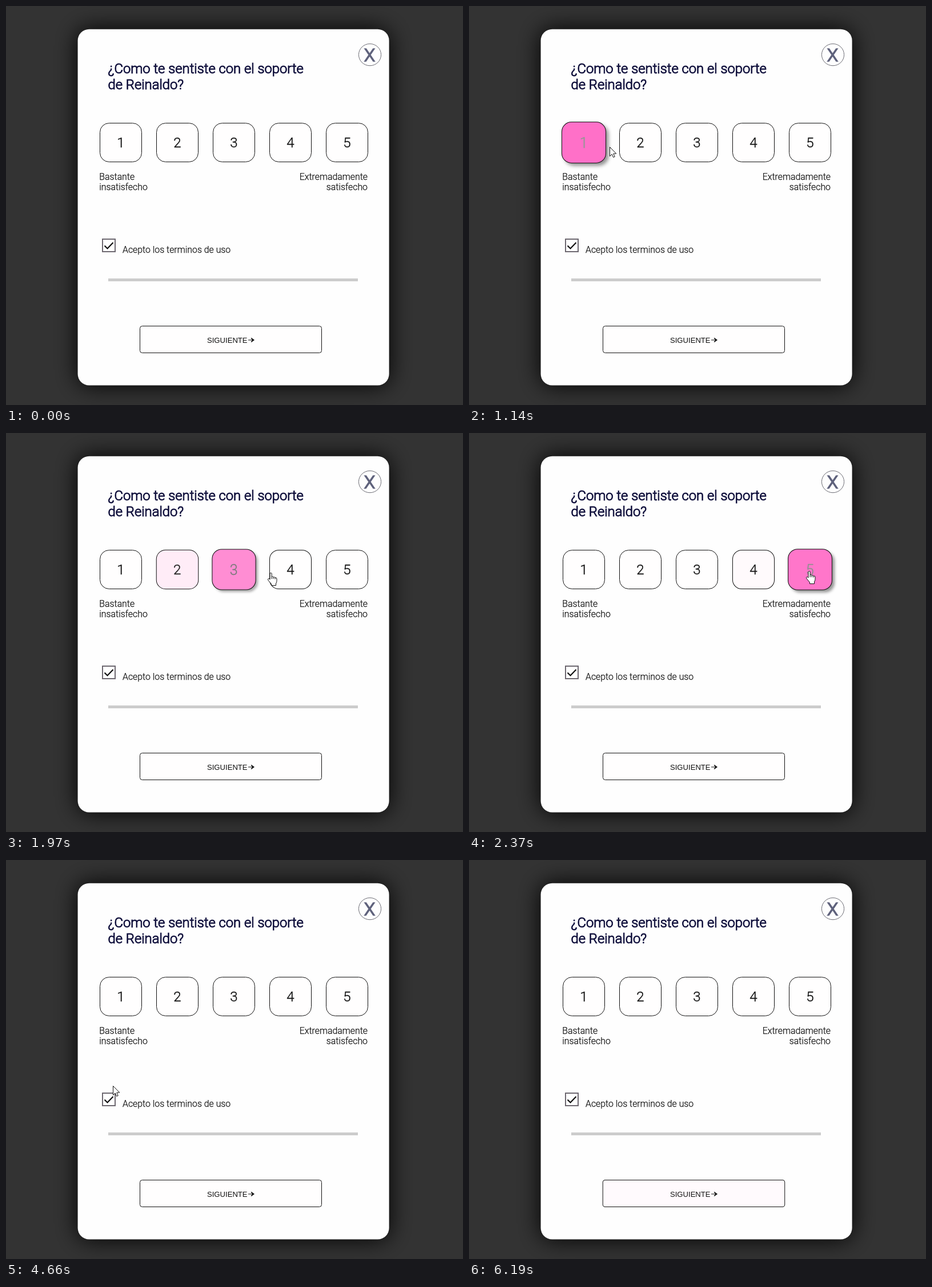
An HTML page that plays this animation: 800 by 700 pixels, repeating every 6590 ms.

```html
<!DOCTYPE html>
<html lang="es">
<head>
<meta charset="utf-8">
<style>
html, body { margin: 0; width: 100%; height: 100%; overflow: hidden; background: #333; }
svg { display: block; width: 800px; height: 700px; }
text { font-family: Roboto, sans-serif; font-weight: 300; }
.title { font-size: 23.8px; fill: #10103c; stroke: #10103c; stroke-width: 1px; }
.label { font-size: 15.85px; fill: #111; stroke: #111; stroke-width: .25px; }
.num { font-size: 24px; text-anchor: middle; fill: currentColor; stroke: currentColor; stroke-width: .4px; }
.next { font: 13.1px "Liberation Sans", Arial, sans-serif; }
.end { text-anchor: end; }
</style>
</head>
<body>
<svg viewBox="0 0 800 700" xmlns="http://www.w3.org/2000/svg">
  <defs id="defs">
    <filter id="glow" filterUnits="userSpaceOnUse" x="0" y="-80" width="800" height="860">
      <feGaussianBlur stdDeviation="20"/>
    </filter>
  </defs>
  <rect width="800" height="700" fill="#333"/>
  <rect x="125.6" y="40.7" width="545" height="624.8" rx="20" filter="url(#glow)"/>
  <rect x="125.6" y="40.7" width="545" height="624.8" rx="20" fill="#fefefe"/>

  <text class="title" x="178.5" y="117.7">¿Como te sentiste con el soporte</text>
  <text class="title" x="178.5" y="145.7">de Reinaldo?</text>

  <g id="close">
    <ellipse cx="637" cy="85.5" rx="19.6" ry="19.2" fill="none" stroke="#6c6c74"/>
    <text x="636.5" y="97" font-size="31" text-anchor="middle" fill="#5f627c" stroke="#5f627c" stroke-width="1.7">X</text>
  </g>

  <text class="label" x="163.3" y="304.8">Bastante</text>
  <text class="label" x="163.3" y="323">insatisfecho</text>
  <text class="label end" x="633" y="304.8">Extremadamente</text>
  <text class="label end" x="633" y="323">satisfecho</text>

  <rect x="169" y="409" width="22" height="22" fill="#fff" stroke="#6d6870" stroke-width="2"/>
  <path id="check" d="M172.5 420.5L177.5 425.5L187.5 415" fill="none" stroke="#111" stroke-width="2.2"/>
  <text class="label" x="204" y="432.5">Acepto los terminos de uso</text>
  <rect x="179" y="478" width="437" height="5" fill="#ccc"/>

  <g id="buttons"></g>

  <g id="arrow" fill="#fff" stroke="#111" stroke-linejoin="round">
    <path d="M.5 .5V16.5L4.2 13L6.6 18.5L9.2 17.4L6.8 12H11.8Z"/>
  </g>
  <g id="hand" fill="#fff" stroke="#111" stroke-linejoin="round">
    <path d="M4 12V2a1.6 1.6 0 0 1 3.2 0V7Q9.2 6 10 7.8Q12 7 12.9 8.7Q16 8.2 16 11V14.5Q16 17 14.5 19V22.5H6.5V20L1.3 13.8Q-.3 11.5 1.2 10.5Q2.6 10 4 12Z"/>
    <path d="M7.2 7V11M10.1 8V11M13 9V11.5" fill="none"/>
  </g>
</svg>
<script>
const LOOP = 6590, FADE = 500, LEAVE = 5930;
const NS = "http://www.w3.org/2000/svg";
const $ = id => document.getElementById(id);

function add(parent, tag, attrs, label) {
  const el = document.createElementNS(NS, tag);
  for (const k in attrs) el.setAttribute(k, attrs[k]);
  if (label) el.textContent = label;
  parent.appendChild(el);
  return el;
}

// Pointer stops: arrival time, x, y and an optional rest
const path = [
  [100, 768, 690], [130, 755, 642, 170], [750, 293, 357], [900, 236, 272],
  [960, 222, 252], [1100, 239, 247], [1500, 320, 248], [1640, 337, 247],
  [2215, 561, 243], [2370, 595, 242], [2500, 612, 205], [2740, 634, 104],
  [3160, 640, 84, 140], [3370, 672, 110], [3540, 450, 391], [3910, 187, 396, 750],
  [4805, 262, 562], [5030, 350, 592], [5310, 395, 600, 420], [LEAVE, 775, 700]
].flatMap(([t, x, y, rest]) => rest ? [[t, x, y], [t + rest, x, y]] : [[t, x, y]]);

const slope = (i, k) => path[i] && path[i + 1]
  ? (path[i + 1][k] - path[i][k]) / (path[i + 1][0] - path[i][0]) : 0;

function tangent(i, k) {
  const a = slope(i - 1, k), b = slope(i, k);
  return a * b > 0 ? 2 * a * b / (a + b) : 0;
}

// Monotone cubic through the stops
function pointer(t) {
  let i = 0;
  while (i < path.length - 2 && path[i + 1][0] <= t) i++;
  const [a, b] = [path[i], path[i + 1]], d = b[0] - a[0];
  const u = Math.min(1, Math.max(0, (t - a[0]) / d)), v = 1 - u;
  return [1, 2].map(k =>
    a[k] * v * v * (1 + 2 * u) + b[k] * u * u * (3 - 2 * u) +
    d * u * v * (v * tangent(i, k) - u * tangent(i + 1, k)));
}

// First and last moment the pointer is inside a shape
function visit(inside) {
  const times = [];
  for (let t = 100; t < LEAVE; t += 5) if (inside(...pointer(t))) times.push(t);
  return { start: times[0], end: times[times.length - 1] + 5 };
}

// CSS "ease": cubic-bezier(.25, .1, .25, 1)
function ease(x) {
  if (x <= 0) return 0;
  if (x >= 1) return 1;
  const bez = (u, a, b) => 3 * u * (1 - u) ** 2 * a + 3 * u * u * (1 - u) * b + u ** 3;
  let lo = 0, hi = 1;
  for (let i = 0; i < 24; i++) {
    const mid = (lo + hi) / 2;
    if (bez(mid, .25, .25) < x) lo = mid; else hi = mid;
  }
  return bez(lo, .1, 1);
}

function hover(t, { start, end }) {
  if (t < end) return ease((t - start) / FADE);
  const peak = ease((end - start) / FADE);
  return peak * (1 - ease((t - end) / (FADE * peak)));
}

const mix = (a, b, p) => Math.round(a + (b - a) * p);

function makeButton(id, x, y, w, h, rx) {
  const filter = add($("defs"), "filter", {
    id: "blur" + id, filterUnits: "userSpaceOnUse",
    x: x - 30, y: y - 30, width: w + 70, height: h + 70
  });
  const blur = add(filter, "feGaussianBlur", { stdDeviation: 0 });
  const g = add($("buttons"), "g", {});
  const box = { x, y, width: w, height: h, rx };
  const shadow = add(g, "rect", { ...box, filter: `url(#blur${id})` });
  const face = add(g, "rect", { ...box, stroke: "#111" });
  const span = visit((px, py) => px >= x && px <= x + w && py >= y && py <= y + h);
  return { g, blur, shadow, face, ...span, cx: x + w / 2, cy: y + h / 2 };
}

const buttons = [1, 2, 3, 4, 5].map((n, i) => {
  const b = makeButton(n, 164.5 + i * 99, 205.5, 73, 68, 16);
  b.ink = add(b.g, "text", { class: "num", x: b.cx - .2, y: 248.3 }, String(n));
  return b;
});

const next = makeButton(6, 234.5, 561.5, 318, 47, 4);
next.ink = add(next.g, "g", { fill: "currentColor" });
add(next.ink, "text", { class: "next", x: 352, y: 590.8 }, "SIGUIENTE");
add(next.ink, "path", { d: "M424 585.4H431L428.6 582.9L429.6 582.1L435 586L429.6 589.9L428.6 589.1L431 586.6H424Z" });
buttons.push(next);

const close = visit((x, y) => Math.hypot(x - 637, y - 85.5) < 20);

function zoom(el, cx, cy, s) {
  el.setAttribute("transform", `translate(${cx} ${cy}) scale(${s}) translate(${-cx} ${-cy})`);
}

function show(el, on) {
  el.setAttribute("visibility", on ? "visible" : "hidden");
}

function paintButton(b, t) {
  const p = hover(t, b);
  const ink = mix(16, 255, p);
  zoom(b.g, b.cx, b.cy, 1 + .1 * p);
  show(b.shadow, p > .004);
  b.shadow.setAttribute("transform", `translate(${8 * p} ${8 * p})`);
  b.shadow.setAttribute("fill-opacity", .75 * p);
  b.blur.setAttribute("stdDeviation", 5 * p);
  b.face.setAttribute("fill", `rgb(255,${mix(254, 0, p)},${mix(254, 157, p)})`);
  b.ink.style.color = `rgb(${ink},${ink},${ink})`;
}

function draw(t) {
  for (const b of buttons) paintButton(b, t);
  zoom($("close"), 637, 85.5, 1 + .15 * hover(t, close));
  show($("check"), t < 4050 || t >= 4450);

  const [x, y] = pointer(t).map(Math.round);
  const over = [...buttons, close].some(b => t >= b.start && t < b.end);
  const visible = t >= 100 && t < LEAVE;
  show($("arrow"), visible && !over);
  show($("hand"), visible && over);
  $("arrow").setAttribute("transform", `translate(${x} ${y})`);
  $("hand").setAttribute("transform", `translate(${x - 5} ${y})`);
}

const began = performance.now();
function tick() {
  draw((performance.now() - began) % LOOP);
  requestAnimationFrame(tick);
}
draw(0);
requestAnimationFrame(tick);
</script>
</body>
</html>
```
